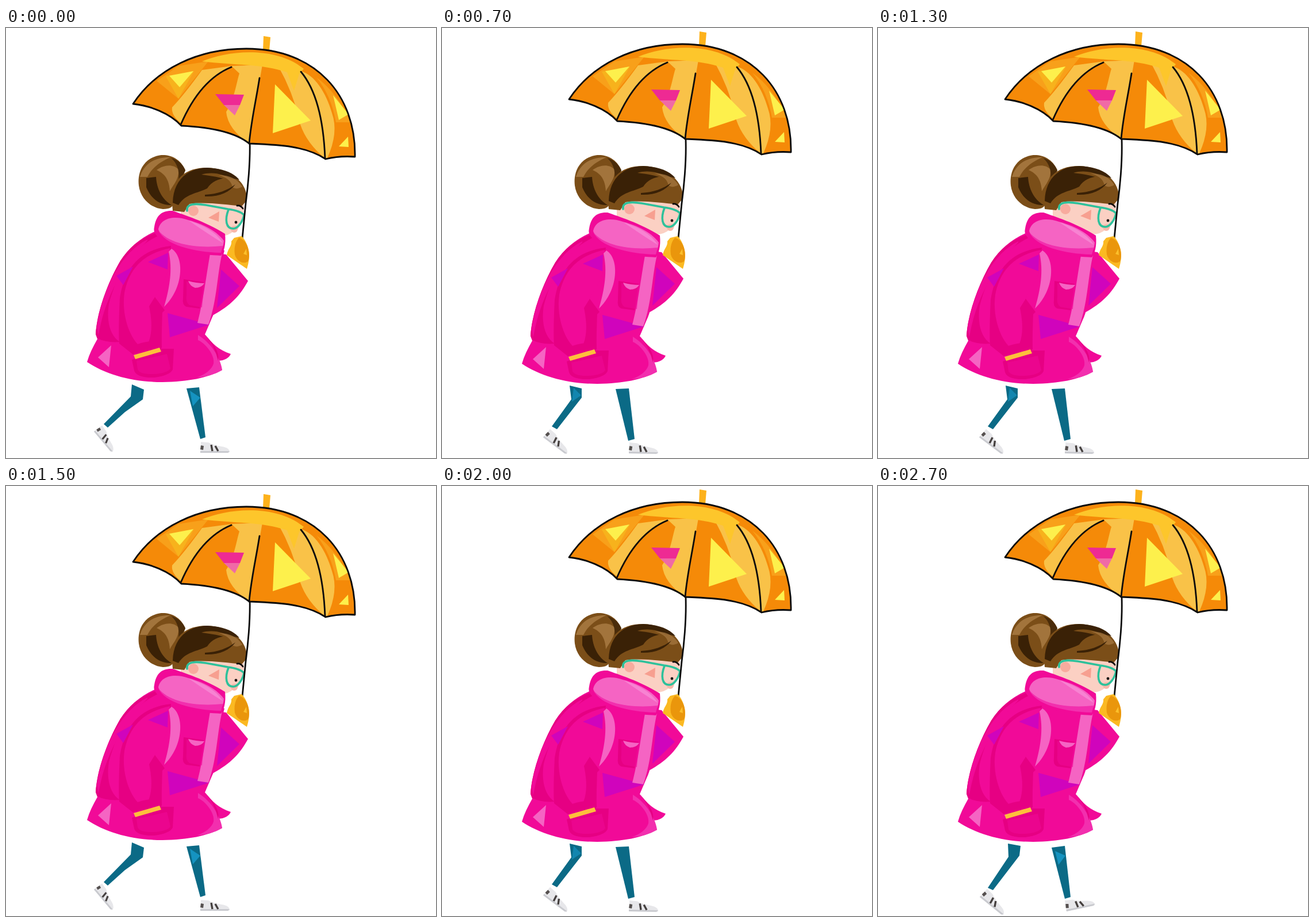
Recreate the animation shown at these times as an HTML page. Size 748 px wide and 748 px high, loop 2800 ms.

```html
<!DOCTYPE html>
<html lang="en">
<head>
<meta charset="utf-8">
<title>Walk with umbrella</title>
<style>
  html, body { margin: 0; width: 100%; height: 100%; overflow: hidden; background: #fff; }
  svg { display: block; width: 100vw; height: 100vh; }
  .ink { fill: none; stroke: #0b0b0b; stroke-width: 2.8; stroke-linecap: round; stroke-linejoin: round; }
  .orange { fill: #f58a08; }
  .amber { fill: #f8a01a; }
  .gold { fill: #f9c248; }
  .sun { fill: #fdc62b; }
  .lemon { fill: #fdf04c; }
  .hair { fill: #7b4e18; }
  .dark { fill: #3a2106; }
  .tan { fill: #a2743c; }
  .skin { fill: #fbd0c3; }
  .blush { fill: #f79f90; }
  .coat { fill: #f10a98; }
  .deep { fill: #e60083; }
  .mid { fill: #f22fae; }
  .pale { fill: #f564c3; }
  .violet { fill: #d004bc; }
  .leg { fill: #0b6a86; }
  .glint { fill: #1593c0; }
  .rim { fill: none; stroke: #2ec19b; stroke-width: 3.6; stroke-linejoin: round; stroke-linecap: round; }
  .pose { visibility: hidden; }
</style>
</head>
<body>
<svg viewBox="0 0 748 748">
  <defs>
    <g id="shoe">
      <path fill="#e7e7ea" d="M1-19 L14-18 Q24-13 37-11 Q51-9 51-1 L48 0 H0Z"/>
      <path fill="#c9cacf" d="M0-3 H51 L48 0 H0Z"/>
      <path fill="#55504f" d="M1-13 L6-12 L5-5 L0-6Z"/>
      <path fill="none" stroke="#45403f" stroke-width="3.4" d="M19-14 L21-3 M26-12 L31-3"/>
    </g>
    <path id="shell" d="M221 132 C262 70 335 36 418 36 C539 36 609 117 607 224 Q580 222 556 228 C520 204 470 203 423 201 C395 178 345 172 305 170 C285 148 250 135 221 132Z"/>
    <clipPath id="canopy"><use href="#shell"/></clipPath>
  </defs>

  <g class="pose">
    <path class="leg" d="M219 620 L240 629 L238 646 L207 668 L177 695 L170 689 L217 641Z"/>
    <path class="leg" d="M314 627 L336 625 L347 712 L338 715Z"/>
    <path class="glint" d="M320 631 L338 643 L325 658Z"/>
    <use href="#shoe" transform="translate(153 702) rotate(50) scale(.93)"/>
    <use href="#shoe" transform="translate(338 739)"/>
  </g>
  <g class="pose">
    <path class="leg" d="M222 622 L243 627 L243 643 L200 698 L191 693 L225 646Z"/>
    <path class="glint" d="M229 626 L242 639 L226 650Z" opacity=".7"/>
    <path class="leg" d="M302 628 L325 627 L335 715 L324 718Z"/>
    <use href="#shoe" transform="translate(176 712) rotate(37) scale(.98)"/>
    <use href="#shoe" transform="translate(325 740) rotate(1)"/>
  </g>
  <g class="pose">
    <path class="leg" d="M226 622 L248 626 L246 643 L200 703 L191 699 L227 645Z"/>
    <path class="leg" d="M302 629 L325 626 L335 715 L325 718Z"/>
    <path class="glint" d="M308 635 L326 643 L314 659Z"/>
    <use href="#shoe" transform="translate(177 715) rotate(39)"/>
    <use href="#shoe" transform="translate(328 740) rotate(-12)"/>
  </g>

  <path class="hair" d="M312 247 C303 227 286 220 270 221 C240 225 228 250 231 274 C234 298 254 314 273 315 C285 315 291 312 294 300Z"/>
  <path class="tan" d="M233 259 C241 234 262 224 286 225 C269 232 254 243 246 259Z"/>
  <path class="tan" d="M262 247 C275 238 290 236 300 246 C302 262 290 274 285 284 C284 266 278 254 262 247Z"/>
  <path class="dark" d="M244 261 L261 259 C262 279 271 298 288 308 C268 309 252 297 244 277Z"/>
  <path class="dark" d="M287 226 C300 229 309 239 312 248 L294 282 C306 257 300 237 287 226Z" opacity=".75"/>

  <g id="head">
    <path class="skin" d="M304 308 L330 298 L413 302 C416 316 412 326 410 333 Q407 337 405 343 Q405 355 395 354 Q388 361 374 362 L304 330Z"/>
    <path class="hair" d="M289 306 C287 268 306 243 350 243 C394 245 421 271 419 300 L410 310 C382 307 344 302 319 306 L310 320 L290 318Z"/>
    <path class="dark" d="M290 304 C291 264 316 244 350 243 C374 244 394 250 406 264 C378 257 360 264 350 279 C333 288 312 288 300 308Z"/>
    <path class="hair" d="M340 255 C360 249 385 254 403 272 C382 261 364 258 340 255Z"/>
    <path class="tan" d="M370 256 C390 256 403 263 411 276 C404 280 399 280 394 277 C392 266 384 260 370 256Z" opacity=".8"/>
    <path class="dark" d="M346 290 C368 289 386 282 399 272 C389 286 370 294 346 293Z"/>
    <circle cx="326" cy="318" r="9" fill="#f8ab9e"/>
    <path class="blush" d="M352 330 L371 319 L370 337Z"/>
    <circle cx="397" cy="350" r="6" fill="#f9b8aa"/>
    <circle cx="400" cy="338" r="2.4" fill="#181010"/>
    <path class="ink" d="M402 309 Q408 308 412 314"/>
    <path class="rim" d="M315 318 C313 305 330 305 348 308 L386 315 C394 316 408 319 414 325 C412 336 404 349 395 349 C383 349 380 334 387 316"/>
  </g>

  <path class="ink" d="M424 194 C425 228 421 275 417 305 L411 366"/>

  <g id="sleeve">
    <path class="coat" d="M375 393 L383 394 L421 440 C407 466 390 483 361 499 L343 508 L340 400Z"/>
    <path class="violet" d="M374 420 L406 449 L367 487Z"/>
  </g>

  <g id="coat">
    <path class="coat" d="M268 350 C238 362 216 379 199 405 C176 444 158 496 156 533 L159 541 C151 555 145 567 141 581 C174 603 220 616 272 616 C318 615 350 609 376 595 L369 579 Q386 578 391 567 C370 560 359 549 346 533 L358 505 C372 478 368 430 380 387Z"/>
    <path class="deep" d="M269 360 C226 377 195 419 179 480 C174 512 182 536 198 546 Q176 548 159 540 L156 532 C158 496 176 444 199 405 C216 379 238 362 269 354Z"/>
    <path class="coat" d="M246 368 C200 390 168 455 158 520 L161 535 C166 500 186 430 246 370Z"/>
    <path class="deep" d="M287 379 C235 385 207 414 198 470 C196 510 196 536 197 549 L221 568 L270 558 L272 492 L250 471 C260 450 283 423 287 379Z"/>
    <path class="coat" d="M285 383 C242 392 215 415 206 461 C201 496 213 533 229 550 Q249 543 268 546 L258 497 L276 489 L259 468 C270 448 291 420 285 383Z"/>
    <path class="deep" d="M259 468 L276 491 L268 499 Q271 528 271 556 L236 564 Q261 541 249 484Z"/>
    <path class="violet" d="M247 407 L282 391 L281 420Z"/>
    <path class="violet" d="M192 431 L221 415 L204 447Z"/>
    <path class="violet" d="M281 496 L354 516 L285 538Z"/>
    <path class="pale" d="M288 384 C311 398 309 453 275 485 C285 451 290 420 283 389Z"/>
    <path class="pale" d="M355 393 L376 392 C367 430 367 476 352 516 L333 513 C343 476 348 433 355 393Z"/>
    <path class="deep" d="M309 437 L344 442 L337 488 L314 485 Q306 482 308 470Z"/>
    <path class="coat" d="M314 441 L345 443 L341 486 L319 482 Q312 477 314 464Z" opacity=".55"/>
    <path class="pale" d="M317 440 Q331 444 345 444 Q340 452 329 452 Q320 449 317 440Z"/>
    <path class="deep" d="M219 577 L269 558 L292 558 L290 594 Q286 604 258 608 Q227 609 223 596Z"/>
    <path class="coat" d="M227 579 L280 567 L286 592 Q282 600 258 602 Q233 603 229 594Z" opacity=".55"/>
    <path class="mid" d="M334 534 C360 550 374 578 376 595 Q358 606 332 608 Q356 599 361 584 C364 568 345 547 334 543Z"/>
    <path class="deep" d="M346 533 C362 551 372 564 369 579 Q363 552 346 533Z"/>
    <path class="pale" d="M160 573 L183 552 L179 590Z"/>
    <path fill="#fdbf3c" d="M222 569 L267 556 L270 563 L225 576Z"/>
    <path class="coat" d="M258 346 C261 326 271 317 290 318 C309 325 346 336 381 358 C383 377 379 389 374 396 C340 394 301 391 267 366 C259 359 256 354 258 346Z"/>
    <path class="pale" d="M265 350 C268 334 285 327 306 331 C338 339 364 350 379 370 C378 382 375 385 370 386 C330 387 270 371 265 350Z"/>
    <path class="mid" d="M265 352 C284 376 331 384 377 379 L374 391 C326 390 276 377 265 352Z"/>
    <path fill="#f783d2" d="M318 335 C342 343 365 354 377 374 Q354 360 318 335Z"/>
  </g>

  <path fill="#fbb922" d="M397 365 L410 362 C422 375 427 396 419 419 L384 395 C386 383 393 380 392 371Z"/>
  <path fill="#ea960c" d="M405 365 C417 367 426 386 422 404 C418 412 402 409 398 394 C396 380 400 371 405 365Z"/>
  <path fill="#fbc02c" d="M418 384 L413 393 L419 395Z"/>

  <g id="umbrella">
    <path fill="#fdb21c" d="M448 14 L460 16 L458 40 L447 39Z"/>
    <g clip-path="url(#canopy)">
      <path class="orange" d="M210 20 H620 V240 H210Z"/>
      <path class="amber" d="M300 66 L352 58 L300 123 L262 92Z"/>
      <path class="gold" d="M341 73 L393 66 C350 84 322 126 305 166 Q287 152 289 138 Q310 116 341 73Z"/>
      <path class="gold" d="M392 66 L446 64 C438 110 430 155 423 201 Q386 176 383 146 C398 122 401 94 406 79Z"/>
      <path class="gold" d="M474 67 L513 75 C543 115 553 170 554 226 Q523 200 512 168 Q501 115 474 67Z"/>
      <path class="gold" d="M513 75 C536 81 557 112 567 148 Q579 182 559 226 L553 226 C552 174 542 115 513 75Z"/>
      <path class="amber" d="M540 86 Q576 112 600 164 L574 164 Q566 118 540 86Z"/>
      <path class="sun" d="M341 58 C387 39 468 31 518 71 L510 80 L501 109 L489 77 C445 62 397 65 341 58Z"/>
      <path fill="#f7b21c" d="M278 84 L327 75 L300 123Z"/>
      <path class="lemon" d="M284 83 L326 75 L302 103Z"/>
      <path class="lemon" d="M468 98 L530 161 L464 183Z"/>
      <path class="lemon" d="M569 117 L596 150 L579 160Z"/>
      <path class="lemon" d="M595 189 L579 206 L596 207Z"/>
      <path fill="#ee2a93" d="M364 115 L414 116 L407 134 H379Z"/>
      <path fill="#f06aa6" d="M379 134 H407 L398 152Z"/>
    </g>
    <use class="ink" href="#shell"/>
    <path class="ink" d="M392 68 C350 85 323 124 304 168 M441 87 C435 126 426 164 423 201 M513 76 C544 113 553 175 555 227"/>
  </g>
</svg>
<script>
  const STEP = 100, STEPS = 28, HALF = 15;
  const shifts = { head: [0, -3], sleeve: [-1, -4], coat: [-2, 3], umbrella: [0, -8] };
  const poses = document.querySelectorAll('.pose');
  let shown = -1;

  // Two strides alternate; a third closes each run of steps.
  function poseAt(n) {
    if (n === HALF - 1 || n === STEPS - 1) return 2;
    return (n < HALF ? n : n - HALF) % 2;
  }

  function show(pose) {
    poses.forEach((g, i) => { g.style.visibility = i === pose ? 'visible' : 'hidden'; });
    for (const id in shifts) {
      const [x, y] = pose ? shifts[id] : [0, 0];
      document.getElementById(id).setAttribute('transform', `translate(${x} ${y})`);
    }
    shown = pose;
  }

  function tick() {
    const pose = poseAt(Math.floor(performance.now() / STEP) % STEPS);
    if (pose !== shown) show(pose);
    requestAnimationFrame(tick);
  }
  tick();
</script>
</body>
</html>
```
